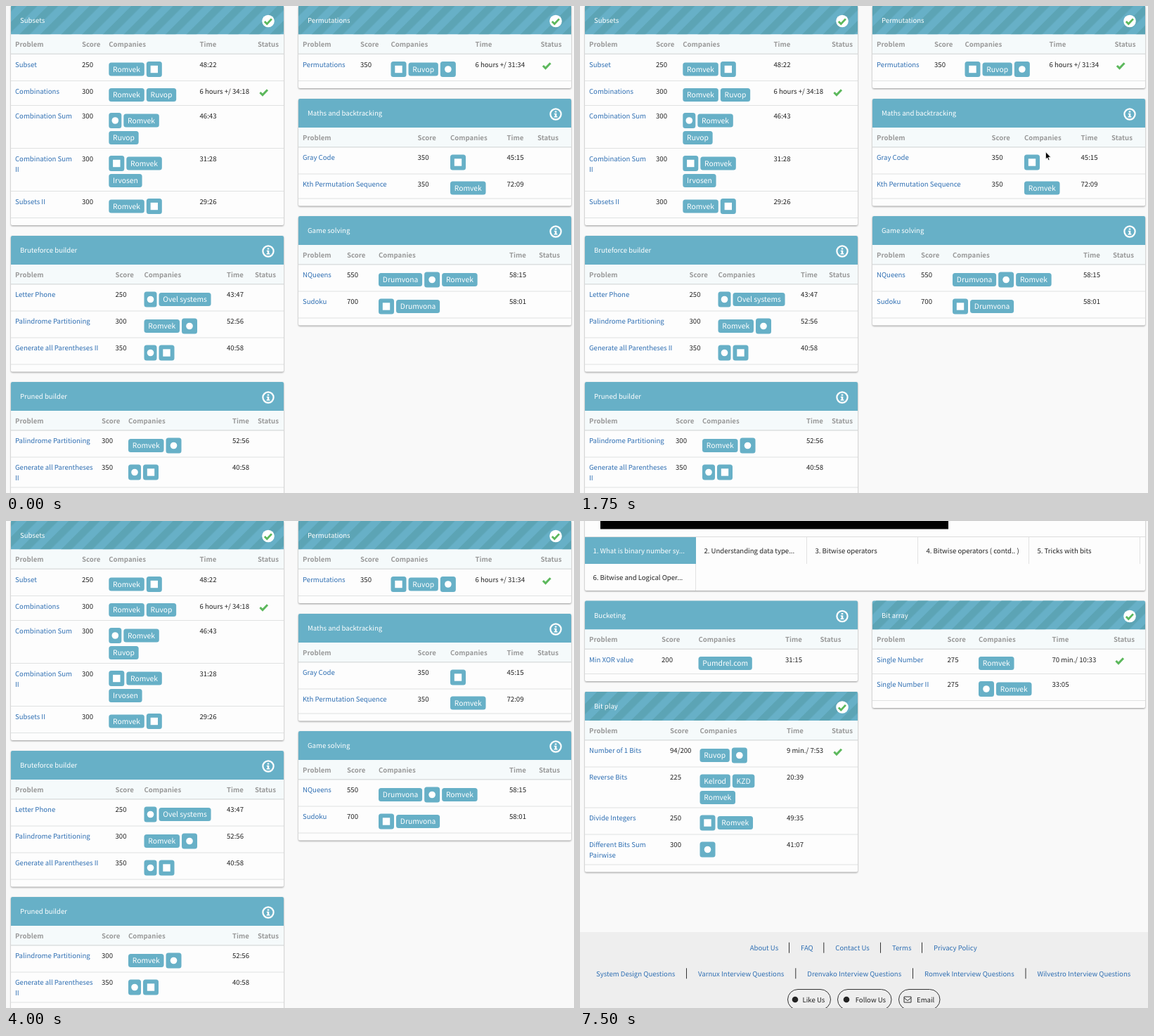
An HTML page for the animation above (7.75 s loop, 808 px wide and 693 px high).

```html
<!DOCTYPE html>
<html lang="en">
<head>
<meta charset="utf-8">
<title>Problem lists</title>
<style>
html, body { margin: 0; width: 100%; height: 100%; overflow: hidden; background: #f9f9f9; }
svg { display: block; width: 808px; height: 693px; }
text {
  font: 9.6px "Noto Sans CJK JP", "Noto Sans CJK SC", "Noto Sans CJK", "Noto Sans", sans-serif;
  fill: #222; white-space: pre; text-rendering: geometricPrecision;
}
.link { fill: #2f6fb3; }
.white { fill: #fff; }
.head { fill: #999; font-weight: 700; }
.tag { fill: #fff; font-size: 10.3px; font-weight: 500; }
.blue { fill: #67b0c7; }
.card { fill: #fdfdfd; filter: drop-shadow(0 1px 1.3px rgba(0,0,0,.4)); }
</style>
</head>
<body>
<svg id="stage" viewBox="0 0 808 693">
  <defs>
    <pattern id="stripes" width="21" height="21" patternUnits="userSpaceOnUse" patternTransform="rotate(45)">
      <rect width="10.5" height="21" fill="#5ca4b5"/>
    </pattern>
  </defs>
</svg>
<script>
const LOOP = 7750, SWITCH = 5250;
const stage = document.getElementById('stage');

function add(parent, tag, attrs) {
  const el = document.createElementNS('http://www.w3.org/2000/svg', tag);
  for (const k in attrs) el.setAttribute(k, attrs[k]);
  return parent.appendChild(el);
}
const rect = (p, x, y, width, height, attrs) => add(p, 'rect', { x, y, width, height, ...attrs });
const circle = (p, cx, cy, r, attrs) => add(p, 'circle', { cx, cy, r, ...attrs });
const path = (p, d, attrs) => add(p, 'path', { d, fill: 'none', ...attrs });

// y is the middle of the capitals
function label(p, x, y, str, cls = '') {
  const el = add(p, 'text', { x, y: y + 3.6, class: cls });
  el.textContent = str;
  return el;
}

function tick(p, x, y, s, width) {
  path(p, `M${x - 5 * s} ${y + .5 * s}l${3.6 * s} ${3.6 * s}l${7 * s} ${-7.4 * s}`,
    { stroke: '#5cb85c', 'stroke-width': width });
}

function badge(p, x, cy, name) {
  const iconWidth = { '#': 22, o: 22, f: 18 }[name];
  if (iconWidth) {
    rect(p, x, cy - 11, iconWidth, 22, { rx: 3.5, class: 'blue' });
    const cx = x + iconWidth / 2;
    if (name === '#') rect(p, cx - 5.2, cy - 5.2, 10.4, 10.4, { class: 'white' });
    else circle(p, cx, cy, 4.8, { class: 'white' });
    return iconWidth;
  }
  const box = rect(p, x, cy - 9.5, 0, 19, { rx: 3.5, class: 'blue' });
  const width = label(p, x + 5.8, cy + .3, name, 'tag').getComputedTextLength() + 11.6;
  box.setAttribute('width', width);
  return width;
}

function headerIcon(p, x, y, done) {
  if (done) {
    circle(p, x, y, 8.8, { class: 'white' });
    return tick(p, x - .4, y, .95, 2.8);
  }
  circle(p, x, y, 7.6, { fill: 'none', stroke: '#fff', 'stroke-width': 2.2 });
  path(p, `M${x - 1.3} ${y - 4.6}h2.6v2.2h-2.6zM${x - 2.2} ${y - 1.3}h3.5v4.2h1.1v1.6h-4.8v-1.6h1.2v-2.6h-1z`, { fill: '#fff' });
}

// rows: [problem, score, tags, time, solved]; "/" breaks lines
function card(p, x, top, title, done, cols, rows) {
  const w = 388, xs = [x + 6, ...cols], line = top + 69;
  const body = rect(p, x, top, w, 0, { rx: 2, class: 'card' });
  const header = { d: `M${x} ${top + 41}v-39q0 -2 2 -2h${w - 4}q2 0 2 2v39z` };
  add(p, 'path', { ...header, class: 'blue' });
  if (done) add(p, 'path', { ...header, fill: 'url(#stripes)' });
  label(p, x + 13, top + 20.8, title, 'white');
  headerIcon(p, x + 366, top + 22, done);
  rect(p, x, top + 41, w, 27, { fill: '#f5fafb' });
  ['Problem', 'Score', 'Companies', 'Time', 'Status'].forEach((h, i) => label(p, xs[i], top + 55.2, h, 'head'));
  rect(p, x, line - 1, w, 1.5, { fill: '#dcdfe0' });

  let bottom = line;
  for (const [name, score, tags, time, solved] of rows) {
    const y = bottom + 14.5;
    const nameLines = name.split('/'), tagLines = tags.split('/').map(l => l.split(','));
    const icons = tagLines[0].some(t => t.length === 1);
    nameLines.forEach((n, i) => label(p, xs[0], y + 15 * i, n, 'link'));
    label(p, xs[1], y, score);
    label(p, xs[3], y, time);
    tagLines.forEach((tagLine, i) => {
      let bx = xs[2];
      const cy = y + (icons ? 7 + 24.5 * i : 5.5 + 23.5 * i);
      for (const t of tagLine) bx += badge(p, bx, cy, t) + 3;
    });
    if (solved) tick(p, xs[4] + 8.4, y + 1.5, 1, 3);
    const tagHeight = (icons ? 23.5 : 20.5) + 23 * (tagLines.length - 1);
    bottom = y + Math.max(tagHeight, nameLines.length > 1 ? 28.5 : 0);
    rect(p, x, bottom - .5, w, 1, { fill: '#e0e2e2' });
  }
  body.setAttribute('height', bottom + 10.5 - top);
}

const backtracking = add(stage, 'g'), bits = add(stage, 'g');

card(backtracking, 7, -.5, 'Subsets', true, [108, 146.3, 275.5, 358], [
  ['Subset', '250', 'Romvek,#', '48:22'],
  ['Combinations', '300', 'Romvek,Ruvop', '6 hours +/ 34:18', true],
  ['Combination Sum', '300', 'f,Romvek/Ruvop', '46:43'],
  ['Combination Sum/II', '300', '#,Romvek/Irvosen', '31:28'],
  ['Subsets II', '300', 'Romvek,#', '29:26'],
]);
card(backtracking, 7, 327, 'Bruteforce builder', false, [155.5, 196.5, 314, 354], [
  ['Letter Phone', '250', 'f,Ovel systems', '43:47'],
  ['Palindrome Partitioning', '300', 'Romvek,o', '52:56'],
  ['Generate all Parentheses II', '350', 'f,#', '40:58'],
]);
card(backtracking, 7, 535, 'Pruned builder', false, [136, 174, 322, 358], [
  ['Palindrome Partitioning', '300', 'Romvek,o', '52:56'],
  ['Generate all Parentheses/II', '350', 'f,#', '40:58'],
]);
card(backtracking, 416, -.5, 'Permutations', true, [504, 547.5, 667.5, 760.5], [
  ['Permutations', '350', '#,Ruvop,o', '6 hours +/ 31:34', true],
]);
card(backtracking, 416, 132, 'Maths and backtracking', false, [585.5, 632, 712.5, 756], [
  ['Gray Code', '350', '#', '45:15'],
  ['Kth Permutation Sequence', '350', 'Romvek', '72:09'],
]);
card(backtracking, 416, 299, 'Game solving', false, [485, 530, 716, 758], [
  ['NQueens', '550', 'Drumvona,o,Romvek', '58:15'],
  ['Sudoku', '700', '#,Drumvona', '58:01'],
]);

// Lesson tabs
rect(bits, 7, -20, 797, 119, { rx: 2, class: 'card' });
rect(bits, 29, 0, 495, 11.5, { fill: '#000' });
rect(bits, 7, 22, 797, 1, { fill: '#ddd' });
rect(bits, 7, 23, 158, 38, { class: 'blue' });
['1. What is binary number sy...', '2. Understanding data type...', '3. Bitwise operators',
 '4. Bitwise operators ( contd.. )', '5. Tricks with bits', '6. Bitwise and Logical Oper...'].forEach((tab, i) => {
  const x = 7 + 158 * (i % 5), y = i < 5 ? 23 : 61;
  label(bits, x + 11.4, y + 19.3, tab, i ? '' : 'white');
  if (i) rect(bits, x + 157, y, 1, 38, { fill: '#e2e2e2' });
});

card(bits, 7, 113.5, 'Bucketing', false, [116, 168.5, 292, 341.5], [
  ['Min XOR value', '200', 'Pumdrel.com', '31:15'],
]);
card(bits, 7, 243, 'Bit play', true, [128, 170.5, 294, 358], [
  ['Number of 1 Bits', '94/200', 'Ruvop,o', '9 min./ 7:53', true],
  ['Reverse Bits', '225', 'Kelrod,KZD/Romvek', '20:39'],
  ['Divide Integers', '250', '#,Romvek', '49:35'],
  ['Different Bits Sum/Pairwise', '300', 'o', '41:07'],
]);
card(bits, 416, 113.5, 'Bit array', true, [522.5, 567, 671.5, 759], [
  ['Single Number', '275', 'Romvek', '70 min./ 10:33', true],
  ['Single Number II', '275', 'o,Romvek', '33:05'],
]);

// Footer
rect(bits, 0, 585, 808, 108, { fill: '#eee' });
function linkRow(y, links) {
  links.forEach(([x, str], i) => {
    label(bits, x, y, str, 'link');
    if (i) rect(bits, x - 17, y - 8, 1, 15, { fill: '#333' });
  });
}
linkRow(607.7, [[241.7, 'About Us'], [314, 'FAQ'], [363.3, 'Contact Us'], [444, 'Terms'], [503, 'Privacy Policy']]);
linkRow(644.3, [[23, 'System Design Questions'], [168, 'Varnux Interview Questions'],
  [323.3, 'Drenvako Interview Questions'], [490, 'Romvek Interview Questions'], [650.5, 'Wilvestro Interview Questions']]);
[[295, 62, 316.5, 'Like Us'], [366, 77.5, 391.7, 'Follow Us'], [453, 59.5, 479, 'Email']].forEach(([x, w, tx, str], i) => {
  rect(bits, x + .5, 666.5, w - 1, 29, { rx: 14.5, fill: 'none', stroke: '#333' });
  label(bits, tx, 681, str);
  if (i < 2) circle(bits, x + (i ? 13 : 11), 681, 4.3, { fill: '#222' });
});
path(bits, 'M461 677h10v8h-10zM461 678.5l5 4l5 -4', { stroke: '#333' });

const pointer = path(stage, 'M.4 .6V11L2.8 8.9L4.3 12.6L6 11.9L4.5 8.3H7.8Z',
  { fill: '#000', stroke: '#fff', 'stroke-width': .8 });

// [from ms, x, y]; no position means hidden
const moves = [
  [0], [750, 712, 116], [1000, 682, 169], [1250, 689, 173], [1500, 660, 206], [1750, 662, 207],
  [2000, 582, 214], [2250, 411, 112], [2500, 412, 112], [2750, 297, 25], [3000],
  [3500, 751, 113], [3750, 680, 158], [4000],
];
const show = (el, on) => el.setAttribute('visibility', on ? 'visible' : 'hidden');

function draw() {
  const t = performance.now() % LOOP;
  const [, x, y] = moves.filter(m => m[0] <= t).pop();
  show(backtracking, t < SWITCH);
  show(bits, t >= SWITCH);
  show(pointer, x !== undefined);
  if (x !== undefined) pointer.setAttribute('transform', `translate(${x} ${y})`);
  requestAnimationFrame(draw);
}
draw();
</script>
</body>
</html>
```
